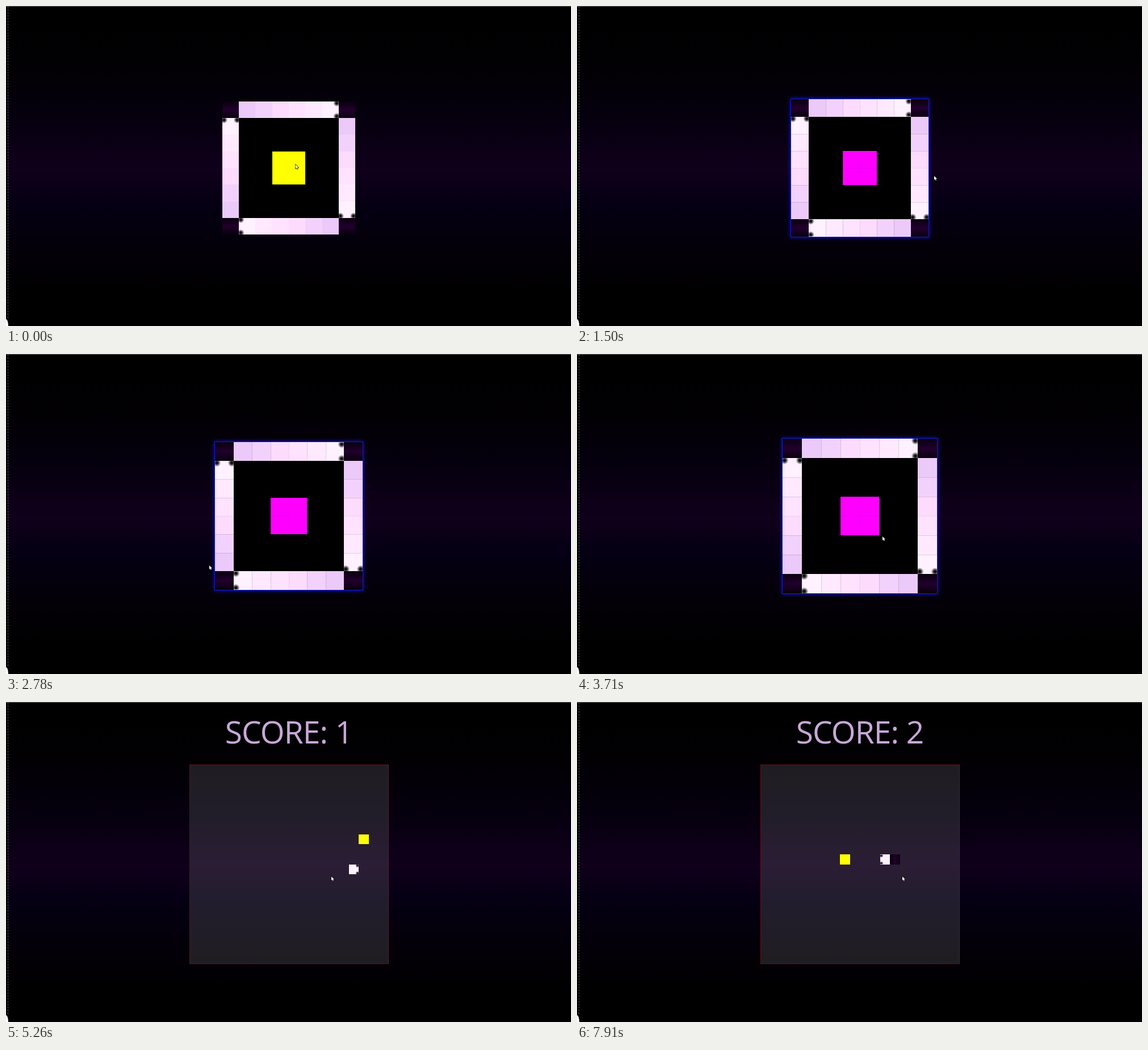
Write an HTML page with a canvas that moves like this. It is 995 px wide and 563 px high and loops after 8000 ms.

```html
<!DOCTYPE html>
<html lang="en">
<head>
<meta charset="utf-8">
<title>Snake</title>
<style>
  html, body { margin: 0; width: 100%; height: 100%; overflow: hidden; background: #000; }
  canvas, svg { position: absolute; left: 0; top: 0; display: block; }
  text { font: 400 55px "Open Sans", "Noto Sans", sans-serif; letter-spacing: -.9px; fill: #c8a8d8; }
</style>
</head>
<body>
<canvas id="stage" width="995" height="563"></canvas>
<svg width="995" height="563"><text id="score" x="498" y="73" text-anchor="middle"></text></svg>
<script>
const W = 995, H = 563, LOOP = 8000, GAME = 4330, TICK = 78.8;
const CX = 498, CY = 285;
const ctx = document.getElementById('stage').getContext('2d');
const score = document.getElementById('score');
const SKIN = ['#ebc9f8', '#f2d2fc', '#fcdbfc', '#fee2fe', '#ffe9fe', '#fff1ff'];
const RIGHT = 0, DOWN = 1, LEFT = 2, UP = 3;

// menu pointer: tick, x, y
const POINTER = [
  [0, 510, 279], [7, 511, 280], [11, 524, 272], [16, 572, 282], [21, 667, 310],
  [26, 729, 346], [30, 655, 470], [32, 560, 456], [33, 500, 430], [34, 425, 400],
  [35, 358, 372], [37, 286, 345], [40, 292, 335], [43, 390, 329], [47, 538, 321], [54, 573, 306]
];
const HOVER = [[1, 20], [34, 35], [43, 54]];

// game moves: time, column, row, heading
const MOVES = [
  [4330, 0, 0, RIGHT], [4490, 12, 10, RIGHT], [4720, 13, 10, RIGHT], [4870, 14, 10, RIGHT],
  [5110, 15, 10, RIGHT], [5260, 16, 10, RIGHT], [5500, 17, 10, RIGHT], [5730, 17, 9, UP],
  [5890, 17, 8, UP], [6130, 17, 7, UP], [6280, 17, 6, UP], [6510, 16, 6, LEFT],
  [6660, 15, 6, LEFT], [6900, 15, 7, DOWN], [7050, 15, 8, DOWN], [7290, 15, 9, DOWN],
  [7440, 14, 9, LEFT], [7680, 13, 9, LEFT], [7910, 12, 9, LEFT]
];
const EAT = 6130;

function rect(color, x, y, w, h) {
  ctx.fillStyle = color;
  ctx.fillRect(x, y, w, h);
}

function blend(x0, y0, x1, y1, stops) {
  const g = ctx.createLinearGradient(x0, y0, x1, y1);
  for (const [at, color] of stops) g.addColorStop(at, color);
  return g;
}

// pixel-snapped square at a grid place
function cellBox(ox, oy, size, col, row) {
  const x = Math.round(ox + col * size), y = Math.round(oy + row * size);
  return [x, y, Math.round(ox + (col + 1) * size) - x, Math.round(oy + (row + 1) * size) - y];
}

function drawHead(box, dir) {
  const [x, y, w, h] = box;
  rect(SKIN[5], ...box);
  ctx.save();
  ctx.beginPath();
  ctx.rect(...box);
  ctx.clip();
  ctx.translate(x + w / 2, y + h / 2);
  ctx.rotate(dir * Math.PI / 2);
  ctx.scale(w, w);
  for (const side of [-.4, .4]) {
    const g = ctx.createRadialGradient(.38, side, 0, .38, side, .21);
    g.addColorStop(0, '#000');
    g.addColorStop(.35, 'rgba(0,0,0,.85)');
    g.addColorStop(1, 'rgba(0,0,0,0)');
    ctx.fillStyle = g;
    ctx.fillRect(-.5, -.5, 1, 1);
  }
  ctx.restore();
}

function drawTail(box, flat) {
  const [x, y, w, h] = box;
  const stops = [[0, '#08000d'], [.5, '#21002c'], [1, '#08000d']];
  rect(blend(x, y, flat ? x + w : x, flat ? y : y + h, stops), ...box);
}

function drawPage() {
  rect(blend(0, 0, 0, H, [
    [0, '#000'], [.16, '#010002'], [.36, '#06000f'], [.51, '#10001b'],
    [.62, '#050013'], [.75, '#040009'], [.9, '#000'], [1, '#000']
  ]), 0, 0, W, H);
  rect('#000', 0, 0, 3, H);
  rect('#000', 0, 561, W, 2);
  rect('#5a5a5a', 0, 0, W, 1);
  for (let y = 1; y < 551; y += 5) rect('#505050', 3, y, 1, 3);
  ctx.fillStyle = '#fff';
  ctx.beginPath();
  ctx.ellipse(0, 563, 4, 12, 0, -Math.PI / 2, 0);
  ctx.lineTo(0, 563);
  ctx.fill();
}

function drawPointer(x, y) {
  ctx.beginPath();
  [[0, 0], [0, 7], [1.6, 5.6], [2.7, 8], [3.8, 7.5], [2.8, 5.2], [5, 5]]
    .forEach(([dx, dy]) => ctx.lineTo(x + dx, y + dy));
  ctx.closePath();
  ctx.lineWidth = 1.2;
  ctx.strokeStyle = '#000';
  ctx.stroke();
  ctx.fillStyle = '#fff';
  ctx.fill();
}

// cubic-bezier(.42, 0, .58, 1)
function easeInOut(p) {
  let lo = 0, hi = 1, u = p;
  for (let i = 0; i < 20; i++) {
    u = (lo + hi) / 2;
    const x = 1.26 * u * (1 - u) * (1 - u) + 1.74 * u * u * (1 - u) + u * u * u;
    if (x < p) lo = u; else hi = u;
  }
  return u * u * (3 - 2 * u);
}

function pointerAt(n) {
  let i = 1;
  while (i < POINTER.length - 1 && POINTER[i][0] < n) i++;
  const [a, ax, ay] = POINTER[i - 1], [b, bx, by] = POINTER[i];
  const k = Math.min(1, (n - a) / (b - a));
  return [Math.round(ax + (bx - ax) * k), Math.round(ay + (by - ay) * k)];
}

function drawMenu(t) {
  const n = Math.min(54, Math.floor((t + 10) / TICK));
  const p = Math.max(0, n * TICK - 140) / 5000;
  const size = 234 * (1 + .2 * easeInOut(p)), s = size / 8;
  const ox = CX - size / 2, oy = CY - size / 2;
  const box = (c, r) => cellBox(ox, oy, s, c, r);
  const hover = HOVER.some(([a, b]) => n >= a && n <= b);

  const whole = [Math.round(ox), Math.round(oy)];
  whole.push(Math.round(ox + size) - whole[0], Math.round(oy + size) - whole[1]);
  if (hover) {
    ctx.save();
    ctx.shadowColor = '#1010ff';
    ctx.shadowBlur = 6;
    rect('#1020b8', whole[0] - 1, whole[1] - 1, whole[2] + 2, whole[3] + 2);
    ctx.restore();
  }
  rect('#000', ...whole);

  for (const c of [0, 7]) for (const r of [0, 7]) drawTail(box(c, r), false);
  for (let i = 0; i < 6; i++) {
    const places = [[i + 1, 0], [7, i + 1], [6 - i, 7], [0, 6 - i]];
    places.forEach(([c, r], dir) => {
      if (i === 5) drawHead(box(c, r), dir);
      else rect(SKIN[i], ...box(c, r));
    });
  }
  const core = hover ? '#f0f' : '#ff0';
  for (const c of [3, 4]) for (const r of [3, 4]) rect(core, ...box(c, r));

  // hairline seams between scaled cells
  if (n) {
    for (let k = 2; k < 7; k++) {
      const color = `rgba(0,0,0,${k === 4 ? .06 : .13})`;
      const [x, y, w, h] = box(k, k);
      for (const e of [0, 7]) {
        const [ex, ey] = box(e, e);
        rect(color, x, ey, 1, h);
        rect(color, ex, y, w, 1);
      }
    }
    const [x, y] = box(4, 4), [x0, y0] = box(3, 3), [x1, y1] = box(5, 5);
    rect('rgba(0,0,0,.06)', x, y0, 1, y1 - y0);
    rect('rgba(0,0,0,.06)', x0, y, x1 - x0, 1);
  }
  drawPointer(...pointerAt(n));
}

function drawGame(t) {
  const box = (c, r) => cellBox(323, 110, 17.55, c, r);
  rect('rgba(255,255,255,.115)', 323, 110, 351, 351);
  rect('#5c141a', 323, 110, 351, 1);
  rect('#5c141a', 323, 110, 1, 351);
  rect('#4a2236', 673, 110, 1, 351);
  rect('#741218', 323, 460, 351, 1);

  let i = MOVES.length - 1;
  while (MOVES[i][0] > t) i--;
  const [, col, row, dir] = MOVES[i];
  const eaten = t >= EAT;
  rect('#ff0', ...(eaten ? box(8, 9) : box(17, 7)));
  if (eaten) {
    const [, c, r] = MOVES[i - 1];
    drawTail(box(c, r), dir % 2 === 0);
  }
  drawHead(box(col, row), dir);
  drawPointer(573, t < 4950 ? 306 : 307);
}

function render(t) {
  drawPage();
  if (t < GAME) drawMenu(t); else drawGame(t);
  const label = t < GAME ? '' : 'SCORE: ' + (t < EAT ? 1 : 2);
  if (score.textContent !== label) score.textContent = label;
}

const start = performance.now();
function tick() {
  render((performance.now() - start) % LOOP);
  requestAnimationFrame(tick);
}
tick();
</script>
</body>
</html>
```
